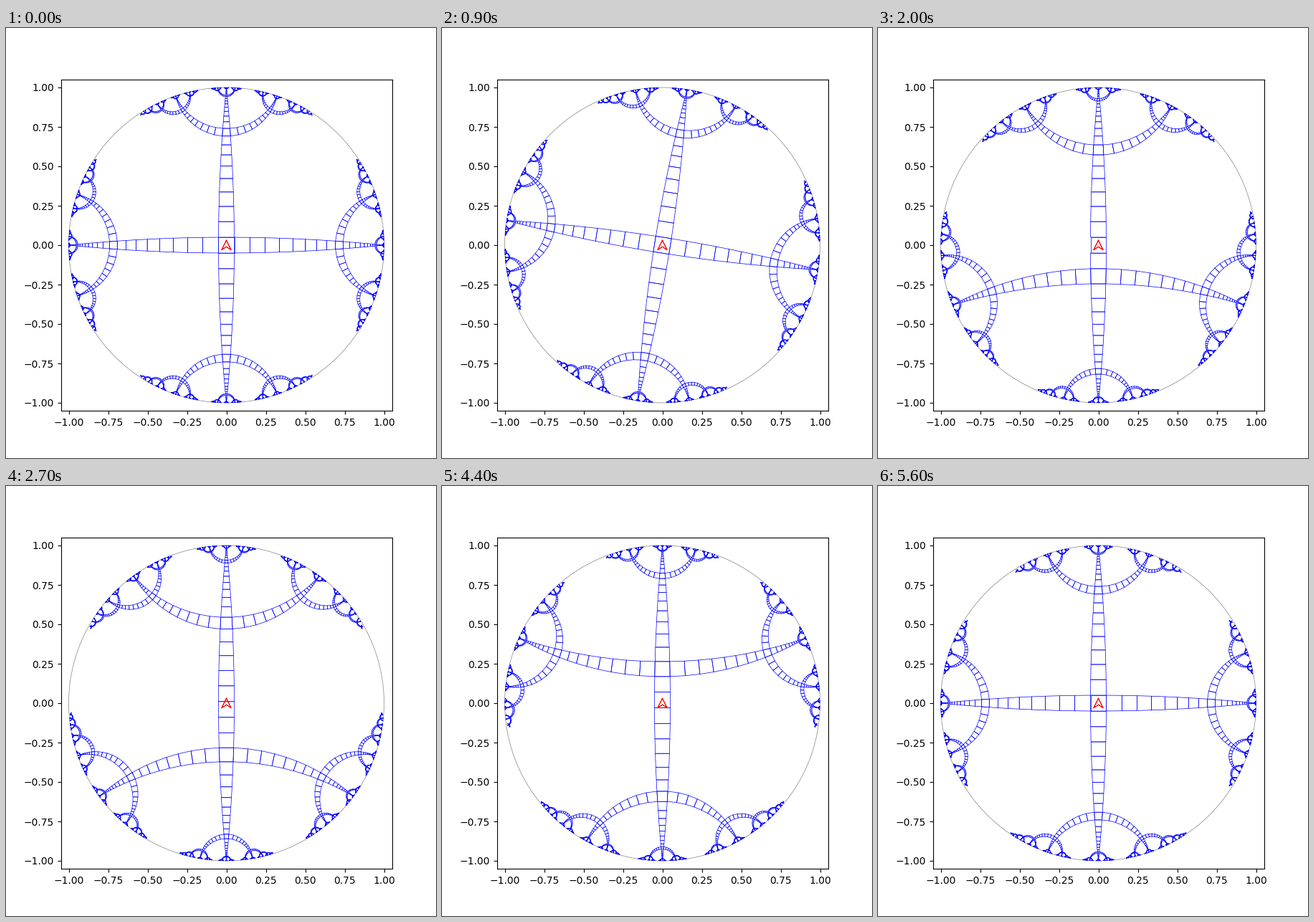
These frames come from a looping animation (600 by 600 pixels, 5700 ms). A matplotlib script:

```python
import numpy as np
import matplotlib.pyplot as plt
from matplotlib.animation import FuncAnimation
from matplotlib.collections import PolyCollection

FRAMES, INTERVAL = 57, 100
TILE = 0.2              # hyperbolic side of one road tile
BLOCK = 9               # tiles from one crossing to the next
DEPTH = 58              # tiles along every path from the first crossing
TURN_FRAMES = 10
STEP = TILE / 5         # hyperbolic distance travelled per frame
MIN_SIZE = 0.00026      # tiles smaller than this on screen are skipped


# A pose (a, b) is the disc isometry z -> (a z + b) / (conj(b) z + conj(a)).
def advance(a, b, dist):
    c, s = np.cosh(dist / 2), np.sinh(dist / 2)
    return a * c + b * s, a * s + b * c


def turn(a, b, deg):
    half = np.exp(1j * np.radians(deg) / 2)
    return a * half, b / half


def branch(a, b, angles):
    poses = [turn(a, b, deg) for deg in angles]
    return [np.concatenate(part) for part in zip(*poses)]


def build_roads():
    a, b = np.array([1 + 0j]), np.array([0j])
    poses = [(a, b)]
    for k in range(DEPTH):
        if k % BLOCK == 0:
            a, b = branch(a, b, (0, 90, 180, 270) if k == 0 else (90, 0, -90))
        a, b = advance(a, b, TILE)
        poses.append((a, b))
    a, b = (np.concatenate(part)[:, None] for part in zip(*poses))

    u = np.tanh(TILE / 4)
    along = u * np.array([-1, 1, 1, -1])
    side = 1j * u * np.array([-1, -1, 1, 1])
    z = (side + along) / (1 + along * side)
    return (a * z + b) / (b.conj() * z + a.conj())


def view(z, frame):
    angle = np.radians(90) * min(frame / TURN_FRAMES, 1)
    dist = np.clip(STEP * (frame - TURN_FRAMES), 0, TILE * BLOCK)
    t = np.tanh(dist / 2)
    z = z * np.exp(1j * angle)
    return (z - 1j * t) / (1 + 1j * t * z)


corners = build_roads()

fig, ax = plt.subplots(figsize=(6, 6), dpi=100)
ax.set_aspect("equal")
ax.set_xlim(-1.05, 1.05)
ax.set_ylim(-1.05, 1.05)
ax.add_patch(plt.Circle((0, 0), 1, fill=False, color="gray", lw=0.5))
roads = PolyCollection([], facecolors="none", edgecolors="blue",
                       linewidths=0.5, joinstyle="round")
ax.add_collection(roads, autolim=False)
ax.plot([0, -0.03, 0, 0.03, 0], [0.03, -0.03, -0.01, -0.03, 0.03],
        color="red", lw=1)


def update(frame):
    z = view(corners, frame)
    z = z[np.abs(z[:, 0] - z[:, 2]) > MIN_SIZE]
    roads.set_verts(np.stack([z.real, z.imag], axis=-1))
    return [roads]


anim = FuncAnimation(fig, update, frames=FRAMES, interval=INTERVAL,
                     init_func=lambda: update(0), repeat=True,
                     repeat_delay=0, blit=False)
plt.show()
```
